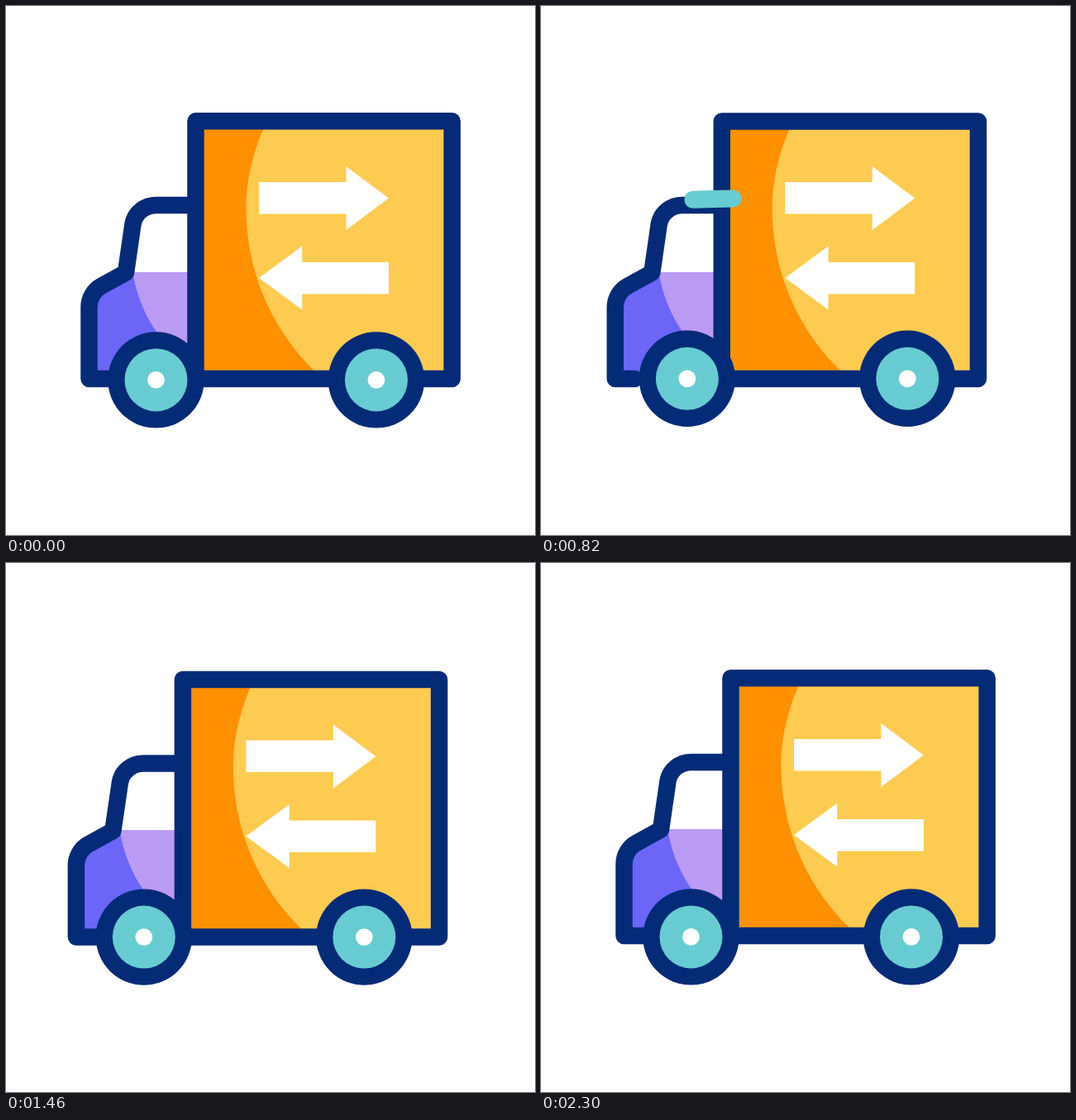
An HTML page for the animation above (2.66 s loop, 640x640 px).

```html
<!DOCTYPE html>
<html lang="en">
<head>
<meta charset="utf-8">
<title>Moving truck</title>
<style>
  html, body { margin: 0; width: 100%; height: 100%; overflow: hidden; background: #fff; }
  svg { display: block; width: 100vw; height: 100vh; }
  .line { fill: none; stroke: #042b77; stroke-width: 20.5; stroke-linecap: round; stroke-linejoin: round; }
  .streak { fill: none; stroke: #67ccd1; stroke-width: 21; stroke-linecap: round; }
</style>
</head>
<body>
<svg viewBox="0 0 640 640">
  <defs>
    <g id="wheel">
      <circle r="58.2" fill="#042b77"/>
      <circle r="38" fill="#67ccd1"/>
      <circle r="10.4" fill="#fff"/>
    </g>
  </defs>
  <g id="body">
    <path fill="#6b66f8" d="M145 322 L115 339 C106 344 100.5 354 100.5 364 V446 H229 V322 Z"/>
    <path fill="#bb9af3" d="M153 322 H229 V440 C207 424 194 411 184 397 C168 375 158 350 153 322 Z"/>
    <path class="line" d="M229 241 H182 C168 241 156 250 153.5 264 L145 322.5 L115 339 C106 344 100.5 354 100.5 364 V451 H124"/>
    <path fill="#fdcb50" d="M229.5 139.3 H539.7 V451 H229.5 Z"/>
    <path fill="#ff9100" d="M235 145 H313 C302 170 290.5 205 290.5 245 C290.5 325 325 395 373 441 L378 446 H235 Z"/>
    <path class="line" d="M229.5 139.3 H539.7 V451 H229.5 Z"/>
    <path fill="#fff" d="M306 213 H411.5 V194 L463 232.5 L411.5 271 V251.5 H306 Z"/>
    <path fill="#fff" d="M463 310 H358.3 V290.5 L306 329 L358.3 367.5 V348.5 H463 Z"/>
  </g>
  <g id="wheels">
    <use href="#wheel" x="181.5" y="452.4"/>
    <use href="#wheel" x="448" y="452.4"/>
  </g>
  <g id="streaks"></g>
</svg>
<script>
const LOOP = 2660, REST = 2300;
const $ = id => document.getElementById(id);

// Rocking: key times shared by the body and the wheels
const keys = [40, 540, 1120, 1620, 2200];
const body = {
  at: [[0, 0], [-20.5, -4.5], [0, 5.2], [-20.5, -4.4], [0, 0]],
  bend: [[0, 1.4], [0, 0], [0, 5.1], [0, 0]]
};
const wheels = {
  at: [[0, 0], [-19.2, -8], [11.3, 5.4], [-22.8, -9.3], [0, 0]],
  bend: [[-4.1, 0.8], [0, 0], [0, 8.2], [-0.8, 0]]
};

// from, to: ends of the arched path; gap: share of it that is drawn
const lanes = [
  { y: 508, mid: 320, from: 80, to: 541, gap: 0.133, span: 200, starts: [167, 958] },
  { y: 176.8, mid: 320, from: 80, to: 541, gap: 0.23, span: 200, starts: [450] },
  { y: 229.3, mid: 500, from: 150, to: 479, gap: 0.147, span: 200, starts: [523, 771] },
  { y: 307.5, mid: 320, from: 26, to: 618, gap: 0.078, span: 115, starts: [1678, 2175] }
];

const clamp = v => Math.min(1, Math.max(0, v));
const ease = u => u * u * (3 - 2 * u);

function pose(track, t) {
  if (t <= keys[0] || t >= keys[4]) return [0, 0];
  const i = keys.findIndex((k, n) => t < keys[n + 1]);
  const p = ease((t - keys[i]) / (keys[i + 1] - keys[i]));
  const a = track.at[i], b = track.at[i + 1], c = track.bend[i];
  return [0, 1].map(n => a[n] + (b[n] - a[n]) * p + c[n] * 4 * p * (1 - p));
}

function place(id, track, t) {
  const [x, y] = pose(track, t);
  $(id).setAttribute("transform", `translate(${x.toFixed(3)} ${y.toFixed(3)})`);
}

for (const lane of lanes) {
  lane.el = document.createElementNS("http://www.w3.org/2000/svg", "path");
  lane.el.setAttribute("class", "streak");
  $("streaks").append(lane.el);
}

function streak(lane, t) {
  const { y, mid, from, to, gap, span, starts } = lane;
  const start = starts.find(s => t > s && t < s + span * (1 + gap));
  if (start === undefined || t >= REST) return "";
  const head = (t - start) / span;
  const point = share => {
    const x = from + (to - from) * clamp(share);
    return x.toFixed(2) + " " + (y + 5e-5 * (x - mid) ** 2).toFixed(2);
  };
  return `M${point(head - gap)} L${point(head - gap / 2)} L${point(head)}`;
}

function draw(t) {
  place("body", body, t);
  place("wheels", wheels, t);
  for (const lane of lanes) lane.el.setAttribute("d", streak(lane, t));
}

function tick() {
  draw(performance.now() % LOOP);
  requestAnimationFrame(tick);
}
tick();
</script>
</body>
</html>
```
